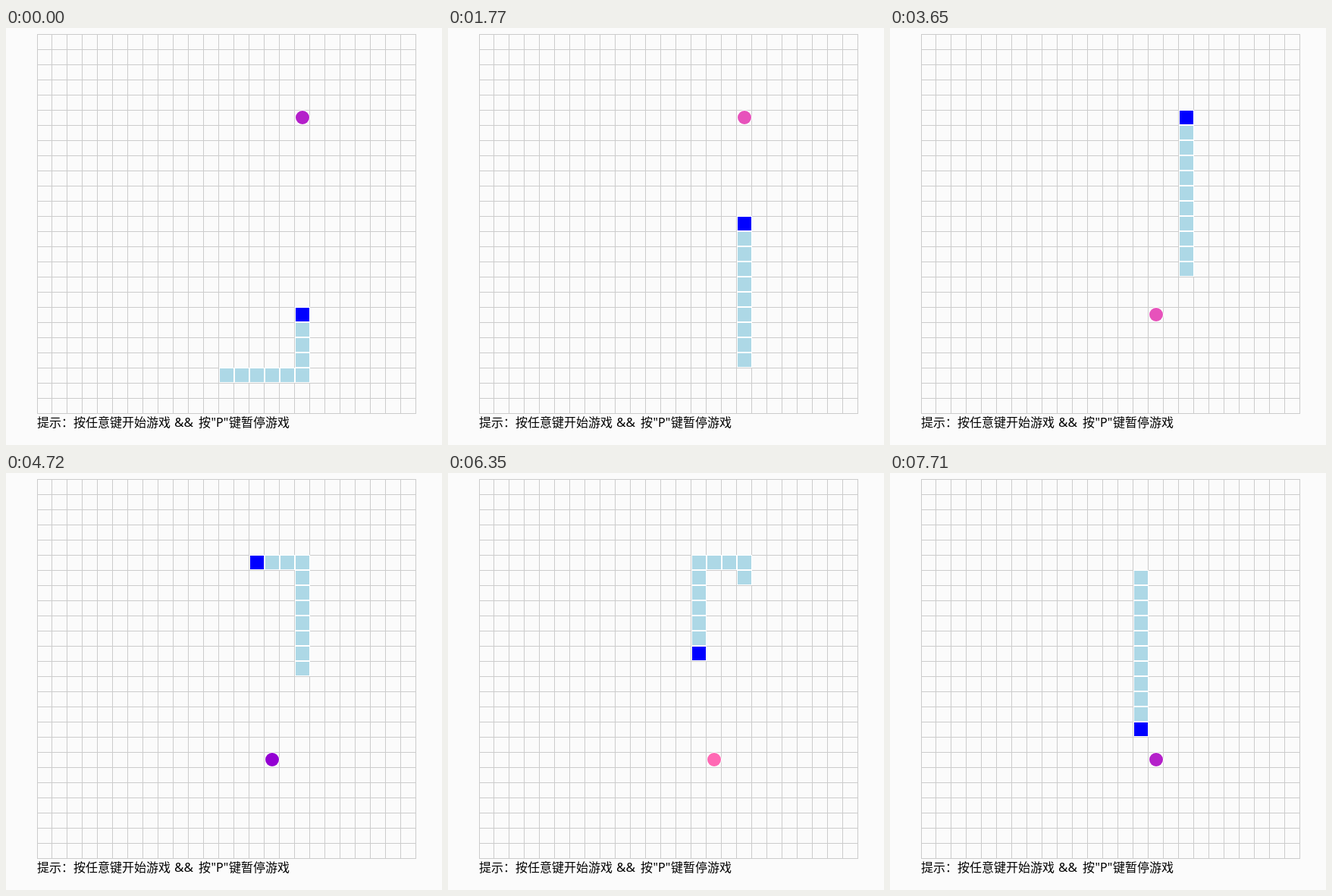
An HTML page with a canvas for the animation above (7.99 s loop, 575 by 550 pixels).

```html
<!DOCTYPE html>
<html lang="zh-CN">
<head>
<meta charset="utf-8">
<style>
html, body { margin: 0; width: 100%; height: 100%; overflow: hidden; background: #fbfbfb; }
canvas, svg { position: absolute; left: 0; top: 0; display: block; }
text { font: 16px "Noto Sans CJK SC", sans-serif; fill: #000; }
.colon { font-family: "Noto Sans CJK JP", sans-serif; }
.latin { font-family: "Noto Sans", sans-serif; }
.amp { font-size: 17px; }
</style>
</head>
<body>
<canvas id="board" width="575" height="550"></canvas>
<svg width="575" height="550">
  <text y="526"><tspan x="41">提示</tspan><tspan x="73" class="colon">：</tspan><tspan x="89">按任意键开始游戏</tspan><tspan x="222" class="latin amp">&amp;&amp;</tspan><tspan x="254">按</tspan><tspan x="270.5" class="latin">"P"</tspan><tspan x="294">键暂停游戏</tspan></text>
</svg>
<script>
const ctx = document.getElementById('board').getContext('2d');
const LOOP = 7990, SIZE = 20, LEFT = 41, TOP = 8, COUNT = 25;

const moveTimes = [120, 390, 790, 1050, 1320, 1630, 1890, 2160, 2440, 2870,
  3140, 3410, 3650, 3920, 4170, 4590, 4870, 5170, 5430, 5680, 5920, 6200,
  6590, 6860, 7130, 7410, 7710];
const tintTimes = [510, 910, 1320, 1760, 2160, 2720, 3140, 3410, 3800, 4170,
  4720, 5170, 5430, 5800, 6330, 6720, 7130, 7560];
// share of hot pink mixed into dark violet
const tints = [0.3, 0.54, 0.78, 1, 0.78, 0];
const EAT_MOVE = 13, START_HEAD = 9;

// route of the snake, from its first tail cell onward
const route = [[12, 22]];
function go(dx, dy, n) {
  while (n--) {
    const [x, y] = route[route.length - 1];
    route.push([x + dx, y + dy]);
  }
}
go(1, 0, 5);
go(0, -1, 17);
go(-1, 0, 3);
go(0, 1, 11);

const passed = (times, t) => times.filter(v => v <= t).length;

function tintColor(k) {
  const mix = (a, b) => Math.round(a + (b - a) * k);
  return `rgb(${mix(148, 255)},${mix(0, 105)},${mix(211, 180)})`;
}

function drawGrid() {
  ctx.fillStyle = '#fbfbfb';
  ctx.fillRect(0, 0, 575, 550);
  ctx.fillStyle = '#ccc';
  for (let i = 0; i <= COUNT; i++) {
    ctx.fillRect(i ? LEFT - 1 + i * SIZE : LEFT, TOP, 1, COUNT * SIZE + 1);
    ctx.fillRect(LEFT, TOP + i * SIZE, COUNT * SIZE, 1);
  }
}

function drawCell([col, row], color) {
  const x = LEFT + col * SIZE, y = TOP + row * SIZE;
  ctx.fillStyle = '#fff';
  ctx.fillRect(x, y, SIZE, SIZE);
  ctx.fillStyle = color;
  ctx.fillRect(x + 1, y + 1, SIZE - 2, SIZE - 2);
}

function disc(x, y, r, color) {
  ctx.fillStyle = color;
  ctx.beginPath();
  ctx.arc(x, y, r, 0, Math.PI * 2);
  ctx.fill();
}

function drawFood([col, row], color) {
  const x = LEFT + (col + 0.5) * SIZE, y = TOP + (row + 0.5) * SIZE;
  disc(x, y, 10, '#fff');
  disc(x, y, 9, color);
}

function draw(t) {
  const moves = passed(moveTimes, t);
  const eaten = moves >= EAT_MOVE;
  const head = START_HEAD + moves;
  const length = eaten ? 11 : 10;
  drawGrid();
  drawFood(eaten ? [15, 18] : [17, 5], tintColor(tints[passed(tintTimes, t) % tints.length]));
  for (let i = head - length + 1; i <= head; i++) {
    drawCell(route[i], i === head ? '#00f' : 'lightblue');
  }
}

const start = performance.now();
function tick() {
  draw((performance.now() - start) % LOOP);
  requestAnimationFrame(tick);
}
tick();
</script>
</body>
</html>
```
